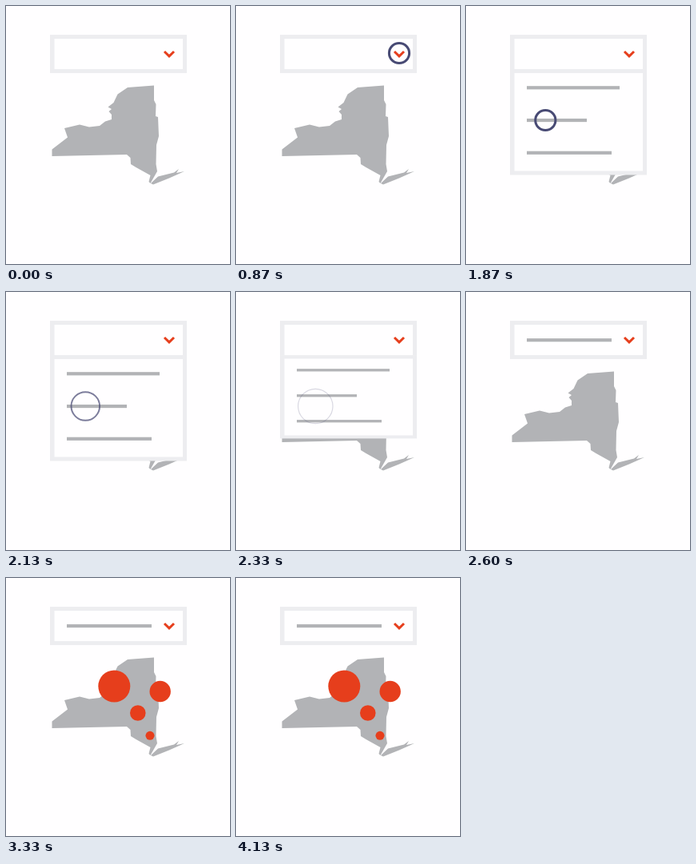
These frames come from a looping animation (280x323 px, 5.87 s). An HTML page with a canvas:

```html
<!DOCTYPE html>
<html lang="en">
<head>
<meta charset="utf-8">
<title>Dropdown map</title>
<style>
html, body { margin: 0; width: 100%; height: 100%; overflow: hidden; background: #fffeff; }
canvas { display: block; width: 280px; height: 323px; }
</style>
</head>
<body>
<canvas id="stage"></canvas>
<script>
const W = 280, H = 323, LOOP = 5870, FPS = 15;
const BG = '#fffeff', BORDER = '#ededf0', GRAY = '#b2b3b6', RED = '#e63e1c', NAVY = '#484a74';
const OPEN_CLICK = 13, PICK_CLICK = 28, PICKED = 36, FIRST_DOT = 40;

const canvas = document.getElementById('stage');
const ctx = canvas.getContext('2d');
const ratio = window.devicePixelRatio || 1;
canvas.width = W * ratio;
canvas.height = H * ratio;

const state = new Path2D('M57.5 188V179.5L77 164.5 73 153 92 148.5 104 151.5 117 150 ' +
  '124 144.5 132 142V136L128.5 132 132 129 127.5 126.5 134.5 121 139.5 110.5 152 102 ' +
  '185 99.5V118L187.5 123 187 138 190 139 191 163 188 174 187.5 198 189 207 180.5 222 ' +
  '178.5 220 180.5 212 162.5 202 156 198 155.5 190 151 186Z');
const island = new Path2D('M181 222L190 213.5 210 208.5 216 204 213 209 223 207 204 215.5 184 223.5Z');

const optionWidths = [116, 75, 106];
const dots = [
  { x: 135.3, y: 135.5, r: 20 },
  { x: 192.7, y: 142, r: 13.2 },
  { x: 164.8, y: 169, r: 9.8 },
  { x: 180, y: 197.3, r: 5.5 }
];

const progress = (step, start, length) => Math.max(0, Math.min(1, (step - start) / length));
const backOut = (u, c) => 1 + (1 + c) * (u - 1) ** 3 + c * (u - 1) ** 2;

function bar(y, width) {
  ctx.fillStyle = GRAY;
  ctx.fillRect(76, y - 2.1, width, 4.2);
}

function box(top, bottom) {
  ctx.fillStyle = BORDER;
  ctx.fillRect(55, top, 171, bottom - top);
  ctx.fillStyle = BG;
  ctx.fillRect(60.5, top + 5, 160.5, bottom - top - 10);
}

function circle(x, y, r) {
  ctx.beginPath();
  ctx.arc(x, y, r, 0, 2 * Math.PI);
}

function menu(step) {
  const opening = 1 - (1 - progress(step, 18.53, 2.47)) ** 3;
  const closing = progress(step, 33.5, 2.5) ** 3;
  const scale = opening - closing;
  if (scale <= 0) return;
  const hinge = 81.5;
  ctx.save();
  ctx.translate(0, hinge);
  ctx.scale(1, scale);
  ctx.translate(0, -hinge);
  box(79, 211.5);
  optionWidths.forEach((width, i) => bar(102.3 + 40.75 * i, width));
  ctx.restore();
}

function chevron() {
  ctx.strokeStyle = RED;
  ctx.lineWidth = 3;
  ctx.beginPath();
  ctx.moveTo(198, 57);
  ctx.lineTo(204, 62.8);
  ctx.lineTo(210, 57);
  ctx.stroke();
}

function ripple(x, y, age) {
  if (age < 0 || age >= 8) return;
  ctx.globalAlpha = 1 - (age / 8) ** 1.8;
  ctx.strokeStyle = NAVY;
  ctx.lineWidth = 3 - 0.26 * age;
  circle(x, y, 12.6 + 1.3 * age);
  ctx.stroke();
  ctx.globalAlpha = 1;
}

// Each dot starts one step later and overshoots more than the one before.
function growDots(step) {
  ctx.fillStyle = RED;
  dots.forEach(({ x, y, r }, i) => {
    const size = backOut(progress(step, FIRST_DOT + i, 7), 0.5 * 1.8 ** i);
    circle(x, y, r * Math.max(0, size));
    ctx.fill();
  });
}

function draw(step) {
  ctx.setTransform(ratio, 0, 0, ratio, 0, 0);
  ctx.fillStyle = BG;
  ctx.fillRect(0, 0, W, H);

  ctx.fillStyle = GRAY;
  ctx.fill(state);
  ctx.fill(island);
  growDots(step);

  box(36, 84);
  menu(step);
  if (step >= PICKED) bar(60 + 3 * 0.4 ** (step - PICKED), optionWidths[2]);
  chevron();

  ripple(204, 59, step - OPEN_CLICK);
  ripple(99.3, 143, step - PICK_CLICK);
}

function tick() {
  const time = performance.now() % LOOP;
  // The offset keeps step changes on 10 ms marks.
  draw(Math.floor((time + 3.4) * FPS / 1000));
  requestAnimationFrame(tick);
}
tick();
</script>
</body>
</html>
```
